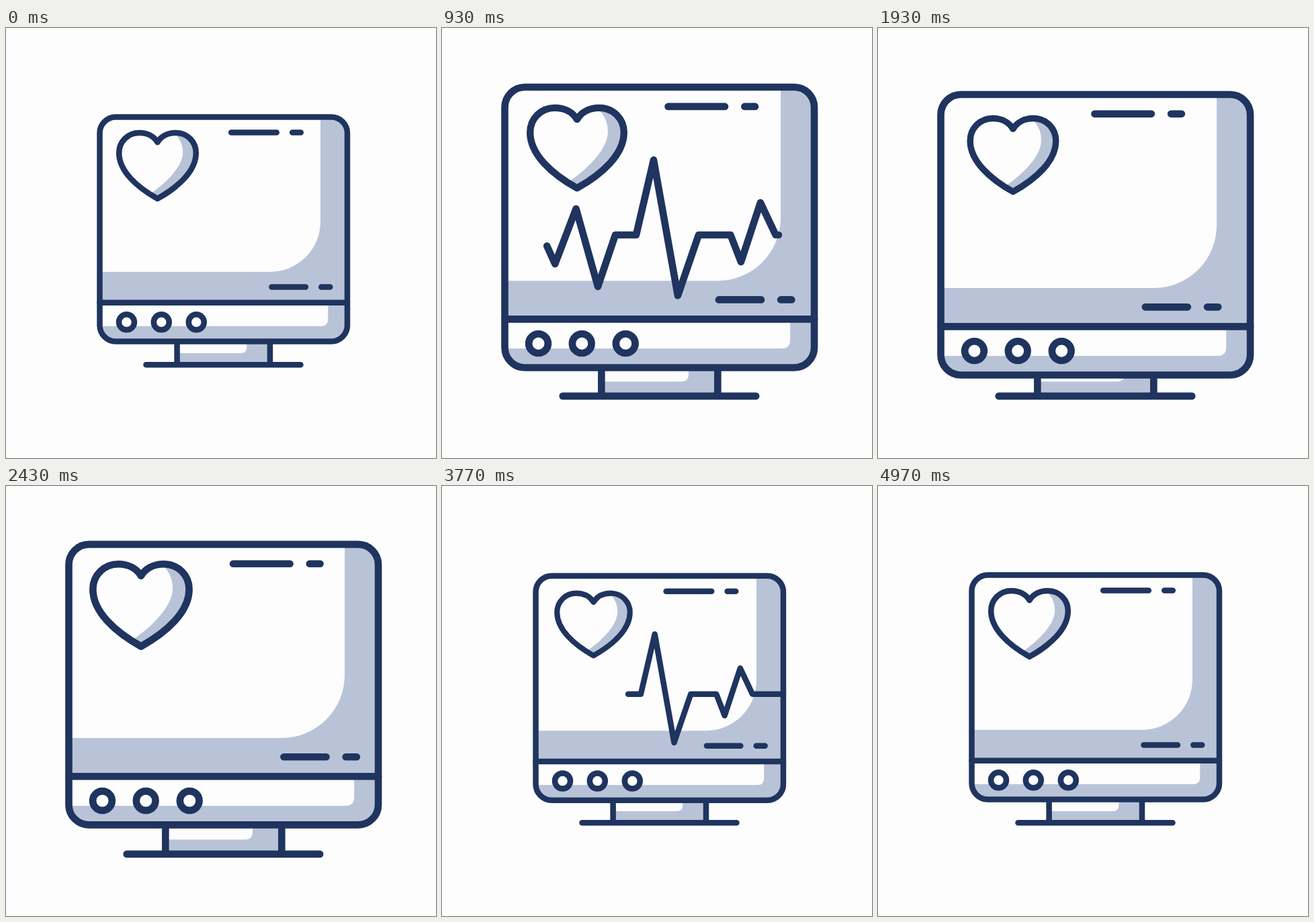
An HTML page that plays this animation: 640x640 px, repeating every 5010 ms.

```html
<!DOCTYPE html>
<html lang="en">
<head>
<meta charset="utf-8">
<title>Heart monitor</title>
<style>
  html, body { margin: 0; width: 100%; height: 100%; overflow: hidden; background: #fdfdfd; }
  svg { display: block; width: 100vw; height: 100vh; }
  .line { fill: none; stroke: #1f345e; stroke-width: 8.5; stroke-linecap: round; stroke-linejoin: round; }
  .pale { fill: #fdfdfd; }
  .shade { fill: #b9c3d8; }
</style>
</head>
<body>
<svg viewBox="0 0 640 640">
  <defs>
    <clipPath id="body"><rect x="139.5" y="132.5" width="368.5" height="334" rx="24"/></clipPath>
    <path id="heart" d="M225.5 170 C220 161 210 156 198.5 156 C181.5 156 168.2 169 168.2 186
      C168.2 213 195 237 225.5 254 C256 237 282.8 213 282.8 186
      C282.8 169 269.5 156 252.5 156 C241 156 231 161 225.5 170 Z"/>
    <clipPath id="heartClip"><use href="#heart"/></clipPath>
  </defs>
  <g id="zoom">
    <!-- stand -->
    <rect class="shade" x="254.6" y="455" width="138.4" height="46"/>
    <path class="pale" d="M254.6 455 H358.3 V475 Q358.3 484 349.3 484 H254.6 Z"/>
    <path class="line" d="M254.6 460 V501 M393 460 V501 M208.5 501.3 H438.5"/>

    <g id="screen">
      <g clip-path="url(#body)">
        <rect class="shade" x="135" y="128" width="378" height="344"/>
        <path class="pale" d="M135 128 H468 V288 A75 75 0 0 1 393 363 H135 Z"/>
        <path class="pale" d="M135 409 H479.3 V433.7 Q479.3 443.7 469.3 443.7 H135 Z"/>
      </g>
      <g id="beat">
        <g clip-path="url(#heartClip)">
          <use href="#heart" class="shade"/>
          <path class="pale" d="M243 153 C256 158 263.2 171 263.2 185 C263.2 205 241 229 213 248 L160 250 V150 Z"/>
        </g>
        <use href="#heart" class="line"/>
      </g>
      <path id="dashes" class="line" d="M335.2 155.6 H402.8 M426.2 155.6 H438.8 M395.5 385.6 H446 M469.3 385.6 H482.3"/>
      <path id="pulse" class="line" pathLength="1" d="M139.5 308.5 H183.8 L199.3 343 L224.3 277.3 L250.3 370
        L271.1 308.5 H295.9 L316.7 219.2 L345.5 380.7 L370.3 308.5 H408.3 L420.7 340.5 L443.9 270 L462 308.5 H508"/>
      <rect class="line" x="139.5" y="132.5" width="368.5" height="334" rx="24"/>
      <path class="line" d="M139.5 408.8 H508"/>
      <g id="knobs"></g>
    </g>
  </g>
</svg>
<script>
  const LOOP = 5010, STEP = 33.4, HALF = 2500;
  const $ = id => document.getElementById(id);
  const clamp = v => Math.min(1, Math.max(0, v));
  const easeOut = (p, n) => 1 - (1 - clamp(p)) ** n;
  const easeInOut = p => p < .5 ? 4 * p ** 3 : 1 - 4 * (1 - p) ** 3;

  $('knobs').innerHTML = [179.5, 231.3, 283.3].map(x =>
    `<circle class="line" style="fill:#fdfdfd" cx="${x}" cy="437.8" r="11.5"/>`).join('');

  const scaleAt = (el, x, y, s) =>
    el.setAttribute('transform', `translate(${x} ${y}) scale(${s}) translate(${-x} ${-y})`);

  // Zoom in during the first half, out during the second.
  function zoom(ms) {
    const k = easeInOut(clamp(ms % HALF / 800));
    return 1 + .25 * (ms < HALF ? k : 1 - k);
  }

  function bob(ms) {
    const p = ms % 1250 / 1250;
    return 14.3 * (p < .5 ? easeOut(p * 2, 3.25) : 1 - easeOut(p * 2 - 1, 4));
  }

  function heartSize(ms) {
    const p = ms % 625 / 625, turn = .455;
    const squeeze = p < turn ? easeOut(p / turn, 9) : 1 - easeOut((p - turn) / (1 - turn), 22);
    return 1 - .125 * squeeze;
  }

  const trace = (ms, span, power) => clamp(ms / span) ** power;

  function draw(ms) {
    const drop = bob(ms), local = ms % HALF;
    scaleAt($('zoom'), 323.6, 315, zoom(ms));
    $('screen').setAttribute('transform', `translate(0 ${drop})`);
    $('dashes').setAttribute('transform', `translate(${-1.3 * drop} 0)`);
    scaleAt($('beat'), 225.5, 202, heartSize(ms));

    const head = trace(local, 965, 1.44), tail = trace(local - 800, 1007, 1.354);
    const pulse = $('pulse');
    pulse.style.display = head - tail > .0005 ? '' : 'none';
    pulse.setAttribute('stroke-dasharray', `${head - tail} 3`);
    pulse.setAttribute('stroke-dashoffset', -tail);
  }

  const start = performance.now();
  function tick() {
    const t = (performance.now() - start) % LOOP;
    draw(Math.floor((t + 7) / STEP) % 150 * 1000 / 30);
    requestAnimationFrame(tick);
  }
  tick();
</script>
</body>
</html>
```
